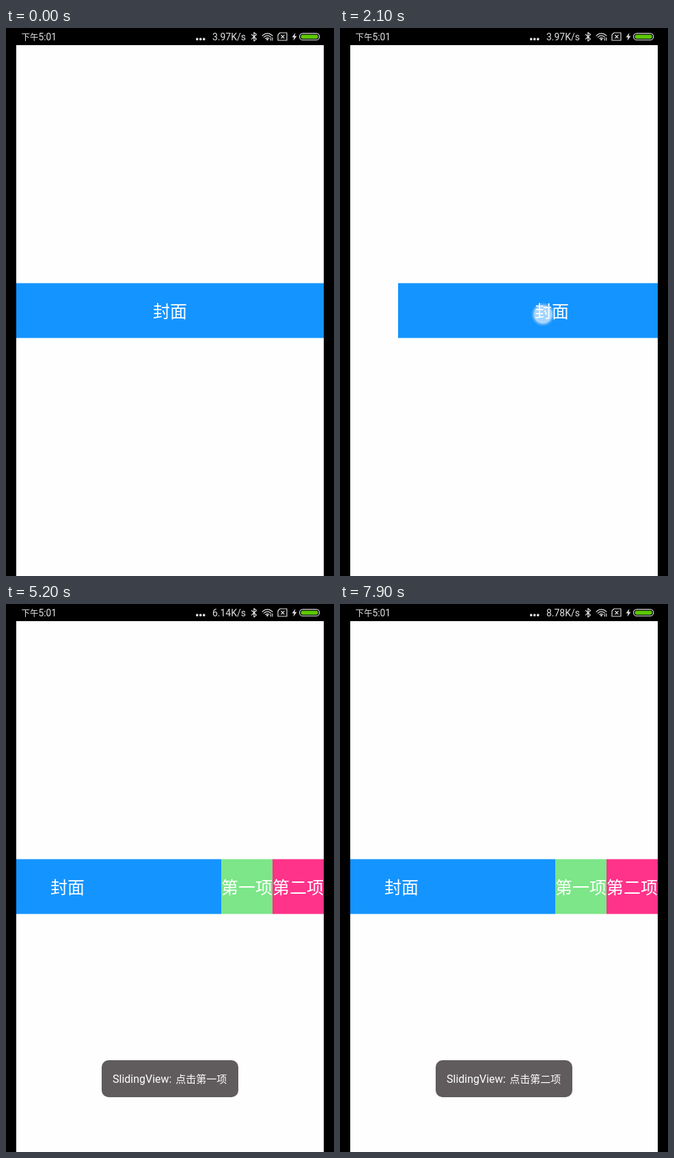
Animation, 480 px wide and 800 px high, one loop 8 s. Source, as an HTML page:

```html
<!DOCTYPE html>
<html lang="zh">
<head>
<meta charset="utf-8">
<title>Sliding menu</title>
<style>
  html, body { margin: 0; width: 100%; height: 100%; overflow: hidden; background: #000; }
  svg { display: block; width: 480px; height: 800px; }
  text { fill: #fff; font-family: "Noto Sans CJK SC Light", "Noto Sans CJK SC", "Noto Sans CJK", sans-serif; font-weight: 300; }
  .latin { font-family: Roboto, "Noto Sans", sans-serif; font-weight: 400; }
  .label { font-size: 25px; text-anchor: middle; }
  .status text { fill: #e2e2e2; }
  .line { fill: none; stroke: #e2e2e2; stroke-width: 1.2; stroke-linecap: round; stroke-linejoin: round; }
</style>
</head>
<body>
<svg viewBox="0 0 480 800">
  <defs>
    <clipPath id="page"><rect x="15" y="25" width="450" height="775"/></clipPath>
    <radialGradient id="glow">
      <stop offset="0" stop-color="#fff" stop-opacity=".6"/>
      <stop offset=".74" stop-color="#fff" stop-opacity=".62"/>
      <stop offset=".78" stop-color="#fff" stop-opacity=".34"/>
      <stop offset="1" stop-color="#fff" stop-opacity="0"/>
    </radialGradient>
  </defs>

  <rect width="480" height="800" fill="#000"/>
  <rect x="15" y="25" width="450" height="775" fill="#fefefe"/>

  <g class="status">
    <text x="22.5" y="18" font-size="12.5">下午</text>
    <text class="latin" x="47.5" y="18" font-size="13.8">5:01</text>
    <g fill="#e2e2e2">
      <rect x="278" y="14.5" width="3.4" height="3.4" rx="1"/>
      <rect x="283" y="14.5" width="3.4" height="3.4" rx="1"/>
      <rect x="288" y="14.5" width="3.4" height="3.4" rx="1"/>
      <path d="M423.5 7l-5 6.6h3l-1 5 5-6.8h-3z"/>
      <circle cx="382.5" cy="16.8" r="1.4"/>
    </g>
    <text id="speed" class="latin" x="351" y="18" font-size="14" text-anchor="end"></text>
    <g class="line">
      <path d="M359.5 9.5l7 6.6-3.6 3V6.5l3.6 3-7 6.6"/>
      <path d="M375 11.2q7.5-6.6 15 0M377.3 13.4q5.2-4.4 10.4 0M379.8 15.4q2.7-2 5.2 0M387.3 15v3M389.8 14v4"/>
      <path d="M401 7h10v11h-13v-8zM402.7 10.5l4.4 4.4m0-4.4l-4.4 4.4"/>
      <rect x="429.6" y="7.9" width="29" height="9.6" rx="4.6"/>
    </g>
    <rect x="431.5" y="9.7" width="25.2" height="6" rx="3" fill="#5ac800"/>
  </g>

  <g clip-path="url(#page)">
    <g id="menu">
      <rect x="315" y="372.5" width="75" height="80" fill="#7ce688"/>
      <rect x="390" y="372.5" width="75" height="80" fill="#ff338a"/>
      <text class="label" x="352.5" y="422.5">第一项</text>
      <text class="label" x="427.5" y="422.5">第二项</text>
    </g>
    <g id="cover">
      <rect x="15" y="372.5" width="450" height="80" fill="#1494ff"/>
      <text class="label" x="240" y="422.5">封面</text>
    </g>
    <g id="toast">
      <rect x="140" y="666" width="200" height="54" rx="10" fill="#605c5e"/>
      <text class="latin" x="156" y="699" font-size="16">SlidingView:</text>
      <text id="message" x="248.3" y="699" font-size="15"></text>
    </g>
    <g id="spot">
      <circle r="17.5" fill="url(#glow)"/>
      <circle r="13.6" fill="none" stroke="#8fbcec" stroke-opacity=".6"/>
    </g>
  </g>
</svg>
<script>
const LOOP = 8000, STEP = 100;
const el = id => document.getElementById(id);
const clamp = v => Math.max(0, Math.min(1, v));
const mix = (a, b, k) => a + (b - a) * k;

// Cover offset: [time, x]
const slide = [
  [100, 0], [200, -22], [300, -75], [400, -137], [500, -170], [600, -156], [700, -150],
  [1400, -150], [1600, -105], [1800, -15], [2000, 56], [2100, 70], [2200, 70],
  [2300, 24], [2400, 5], [2500, 0],
  [2700, 0], [2800, -28], [2900, -80], [3000, -136], [3100, -165], [3200, -168],
  [3300, -156], [3400, -150]
];

// The finger follows the cover: x = origin + offset
const touches = [
  { down: 100, up: 500, origin: 385, y: [440, 451] },
  { down: 1400, up: 2200, origin: 227, y: [440, 415] },
  { down: 2600, up: 3200, origin: 345, y: [440, 457] },
  { down: 3900, up: 4000, origin: 502, y: [417, 417] },
  { down: 6500, up: 6600, origin: 577, y: [417, 417] }
];
const FADE = 260;

const toasts = [
  { start: 4100, end: 6200, text: "点击第一项" },
  { start: 6700, end: 8700, text: "点击第二项" }
];

const speeds = [[0, "3.97K/s"], [2900, "6.14K/s"], [6900, "8.78K/s"]];

function track(keys, t) {
  const i = keys.findIndex(k => k[0] > t);
  if (i === 0) return keys[0][1];
  if (i < 0) return keys[keys.length - 1][1];
  const [t0, a] = keys[i - 1], [t1, b] = keys[i];
  return mix(a, b, (t - t0) / (t1 - t0));
}

function drawTouch(t) {
  const touch = touches.find(p => t >= p.down && t < p.up + FADE);
  el("spot").setAttribute("opacity", touch ? 1 - clamp((t - touch.up) / FADE) : 0);
  if (!touch) return;
  const held = Math.min(t, touch.up);
  const x = touch.origin + track(slide, held);
  const y = mix(...touch.y, (held - touch.down) / (touch.up - touch.down));
  el("spot").setAttribute("transform", `translate(${x} ${y})`);
}

function drawToast(t) {
  const toast = toasts.find(p => t >= p.start && t < p.end + 300);
  if (!toast) return el("toast").setAttribute("opacity", 0);
  const enter = clamp((t - toast.start) / 300);
  const leave = clamp((t - toast.end) / 300);
  el("toast").setAttribute("opacity", enter * (1 - leave));
  el("toast").setAttribute("transform", `translate(0 ${30 * (1 - enter) ** 2})`);
  el("message").textContent = toast.text;
}

function draw(t) {
  const x = track(slide, t);
  el("cover").setAttribute("transform", `translate(${x} 0)`);
  el("menu").setAttribute("opacity", x < 0 ? 1 : 0);
  el("speed").textContent = speeds.filter(s => s[0] <= t).pop()[1];
  drawTouch(t);
  drawToast(t);
}

const begin = performance.now();
function tick() {
  const t = (performance.now() - begin) % LOOP;
  draw(Math.floor(t / STEP) * STEP);
  requestAnimationFrame(tick);
}
draw(0);
requestAnimationFrame(tick);
</script>
</body>
</html>
```
